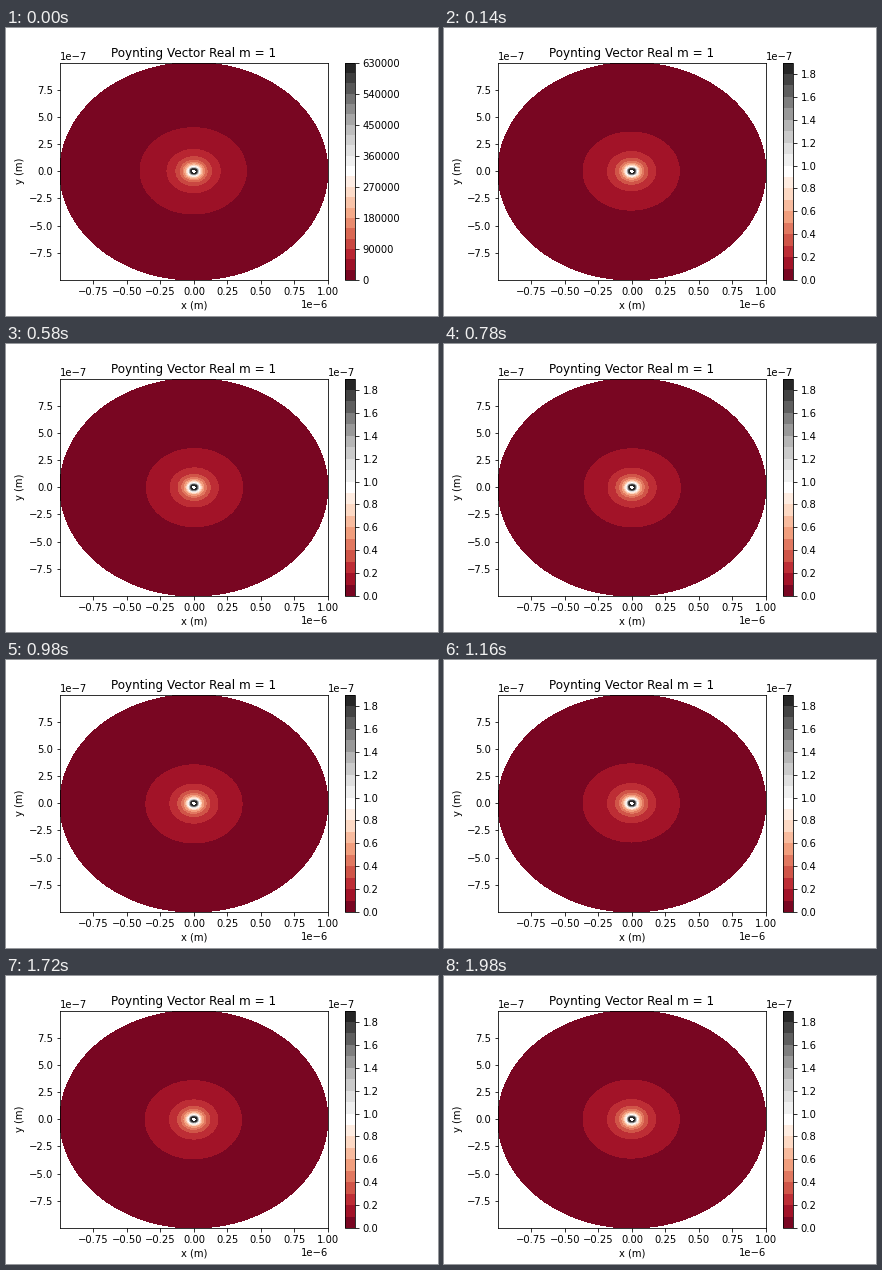
Write a matplotlib script that moves like this. It is 432 px wide and 288 px high and loops after 2 s.

```python
import numpy as np
import matplotlib.pyplot as plt
from matplotlib.animation import FuncAnimation

FRAMES, INTERVAL = 100, 20
R_MAX = 1e-6
TURN = 2 * np.pi * 27 / 92      # phase advance per step
PHASE = np.radians(140)
WOBBLE = 0.016

plt.rcParams.update({"font.family": "DejaVu Sans", "font.size": 10})
fig = plt.figure(figsize=(6, 4), dpi=72, facecolor="white")
ax = fig.add_axes([0.125, 0.125, 0.62, 0.755])

phi, r = np.meshgrid(np.linspace(0, 2 * np.pi, 100),
                     np.linspace(0.0195, 1, 50) * R_MAX)
x, y = r * np.cos(phi), r * np.sin(phi)

# (strength, levels): the opening step has a far larger scale
START = (0.0119, np.arange(22) * 3e4)
STEADY = (0.359e-14, np.arange(20) * 1e-8)


def draw_field(scale, step):
    strength, levels = scale
    power = strength / r * (1 + WOBBLE * np.cos(phi - PHASE - TURN * step))
    return ax.contourf(x, y, power, levels=levels, cmap="RdGy")


def add_bar(scale):
    cax = fig.add_axes([0.78375, 0.125, 0.755 * 288 / 20 / 432, 0.755])
    field = draw_field(scale, 0)
    fig.colorbar(field, cax=cax)
    field.remove()
    return cax


start_bar, steady_bar = add_bar(START), add_bar(STEADY)
ax.set(xlim=(x.min(), x.max()), ylim=(y.min(), y.max()),
       xlabel="x (m)", ylabel="y (m)", title="Poynting Vector Real m = 1")
shown = []


def update(step):
    while shown:
        shown.pop().remove()
    first = step == 0
    start_bar.set_visible(first)
    steady_bar.set_visible(not first)
    shown.append(draw_field(START if first else STEADY, step))
    return shown


anim = FuncAnimation(fig, update, frames=FRAMES, interval=INTERVAL,
                     repeat=True, repeat_delay=0, blit=False)
plt.show()
```
